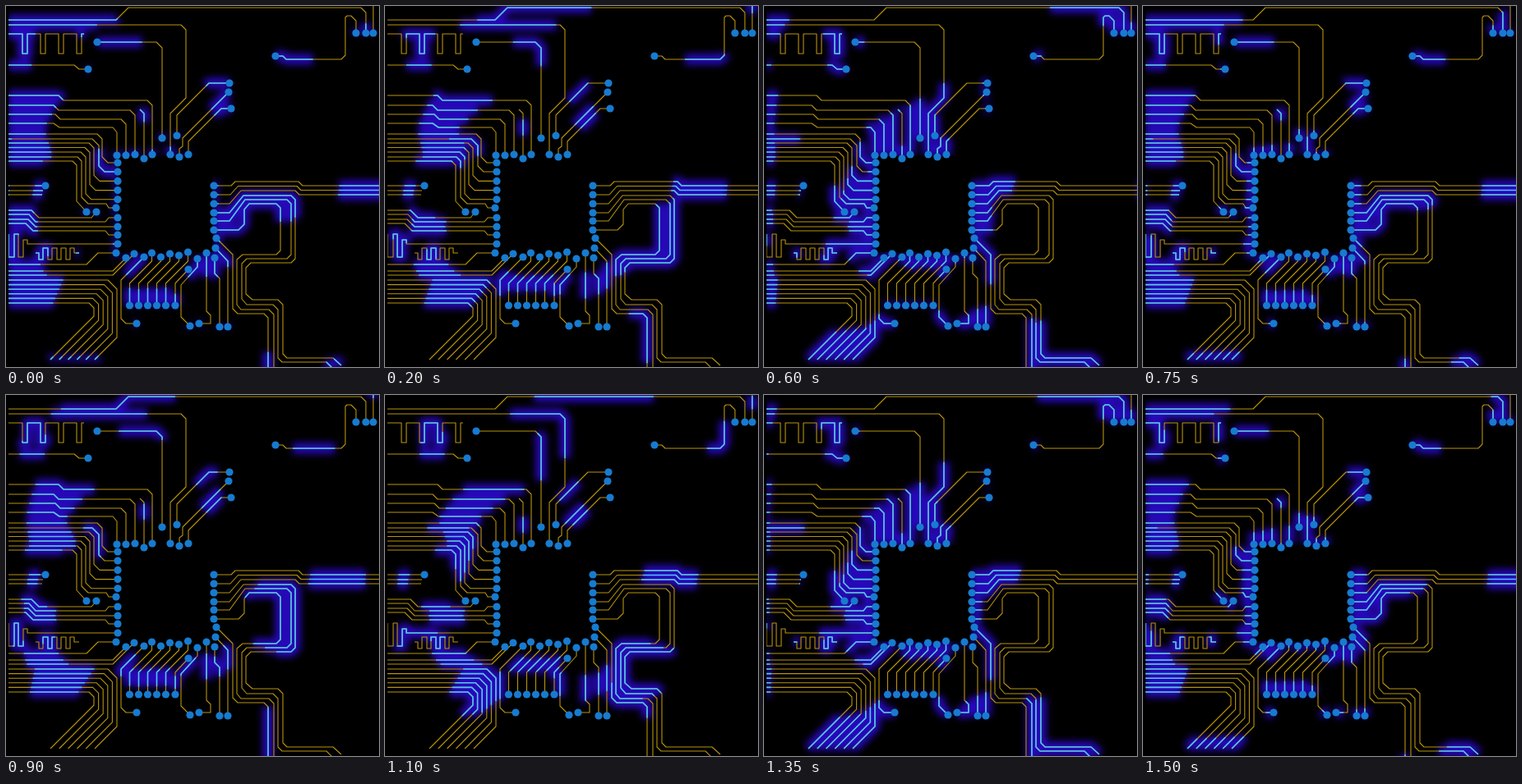
Recreate the animation shown at these times as an HTML page. Size 454 by 440 pixels, loop 1.55 s.

```html
<!DOCTYPE html>
<html lang="en">
<head>
<meta charset="utf-8">
<title>Circuit pulses</title>
<style>
  html, body { margin: 0; width: 100%; height: 100%; overflow: hidden; background: #000; }
  svg { display: block; width: 454px; height: 440px; }
  path { fill: none; stroke-linejoin: round; }
  #base path { stroke: #b8930c; stroke-width: 1.1; }
  #glow path { stroke: #2708b8; stroke-width: 13; }
  #core path { stroke: #4cc4ff; stroke-width: 1.6; }
  #pins circle { fill: #177bd0; }
  #glow path, #core path {
    stroke-dasharray: 31 69;
    animation: flow 1550ms steps(31, end) infinite;
  }
  @keyframes flow {
    from { stroke-dashoffset: 2.5; }
    to { stroke-dashoffset: -197.5; }
  }
</style>
</head>
<body>
<svg viewBox="0 0 454 440">
  <defs>
    <filter id="soft" filterUnits="userSpaceOnUse" x="-30" y="-30" width="514" height="500" color-interpolation-filters="sRGB">
      <feGaussianBlur stdDeviation="4"/>
    </filter>
    <clipPath id="board"><rect x="3" width="451" height="440"/></clipPath>
  </defs>
  <g clip-path="url(#board)">
    <g id="glow" filter="url(#soft)"></g>
    <rect x="137" y="183" width="114" height="117"/>
    <g id="base"></g>
    <g id="core"></g>
    <g id="pins"></g>
  </g>
</svg>
<script>
const NONE = 0, START = 1, END = 2, BOTH = 3;
const layer = id => document.getElementById(id);

function add(parent, tag, attrs) {
  const el = document.createElementNS('http://www.w3.org/2000/svg', tag);
  for (const k in attrs) el.setAttribute(k, attrs[k]);
  return layer(parent).appendChild(el);
}

// Each wire is drawn in its pulse direction; ends says where a pin sits.
function wire(ends, ...paths) {
  for (const d of paths) {
    const base = add('base', 'path', { d });
    add('glow', 'path', { d, pathLength: 100 });
    add('core', 'path', { d, pathLength: 100 });
    const pin = at => {
      const p = base.getPointAtLength(at);
      add('pins', 'circle', { cx: p.x, cy: p.y, r: 4.6 });
    };
    if (ends & START) pin(0);
    if (ends & END) pin(base.getTotalLength());
  }
}

const times = (n, fn) => Array.from({ length: n }, (_, i) => fn(i));

// Top edge
wire(END,
  'M3,17H134l15,-15H432l6,6V33',
  'M3,23H213l6,6V112L200,131V181',
  'M3,72H83l6,5H100',
  'M447,-20V33');
wire(BOTH,
  'M111,44H183l7,7V161',
  'M328,61H337l4,4H408l5,-5V14l2,-2H420l6,6V33');
wire(NONE, 'M3,34H20' + 'v24h6v-24h16'.repeat(3) + 'v24h6v-24h3');

// Upper left to the top pins
wire(END,
  'M3,109H64l6,6H172l6,6V181',
  'M3,121H58l6,6H151l6,6V181',
  'M3,132H60l6,6H140l6,6V182',
  'M3,143H58l7,5H130l5,6V182',
  'M163,126l5,5V186');

// Upper left to the left pins, one of them flowing outwards
times(5, i => {
  const y = 156 + 5.5 * i, x = 117 - 5 * i, pin = 191 + 11.2 * i;
  if (i === 1) wire(START, 'M136,202H120l-7,-7V170l-8,-8H3');
  else wire(END, `M3,${y}H${x - 6}l6,6V${pin - 7}l7,7H136`);
});
wire(END,
  'M3,184H87l5,5V233l8,8H122l3,5H134',
  'M3,189H81l5,5V238L98,251');

// Left middle
wire(START, 'M48,219H3');
wire(NONE, 'M45,225H3', 'M44,230H3');
wire(END,
  'M3,249H31l9,9H104L110,251',
  'M3,254H28l8,9H121l4,-5H136',
  'M3,260H27l9,9H136',
  'M3,265H24l9,9H121l4,5H136',
  'M3,278V306H10V278H15V306H21V285H26V290H136');
wire(NONE, 'M36,301H40v8h5v-14' + 'h6v14h5v-14'.repeat(3) + 'h5v6h6');

// Lower left
wire(END,
  'M3,315H98l14,-14H134',
  'M3,323H130L146,307',
  'M3,328H130L156,302');
wire(NONE, ...times(6, i => {
  const x = 135 - 5.6 * i, y = 334 + 5.6 * i, r = 11 - i;
  return `M3,${y}H${x - r}l${r},${r}V${404 - 5.2 * i}L${108 - 10.8 * i},431`;
}));

// Below the chip
wire(BOTH,
  ...[301, 306, 302, 304, 300].map((y, i) => `M${150.5 + 11 * i},365V338l27,-27V${y}`),
  'M206,365V338L222,321',
  'M168,306L140,334V381l6,6H159',
  'M233,308V318L213,340V379L224,390',
  'M244,301V372l5,5V387H235',
  'M254,307V326l6,6V391',
  'M255,295L270,311V391');

// Upper right to the top pins
wire(BOTH,
  'M272,94H247L208,133V158',
  'M271,105L215,161V171L211,174V184',
  'M274,125H262L222,165V181');

// Right bus
wire(END, ...times(3, i => {
  const y = 219 + 5.5 * i;
  return `M468,${y}H${361 - 2 * i}l-5,-5H${279 + 3.5 * i}L${274 - i},${219 + 11 * i}H253`;
}));

// Loops on the right
wire(START,
  'M253,252H272L289,231H347l5,5V308l-5,5H298l-6,6V351l8,7H331l6,6V424l5,5H398l10,9',
  'M253,262H272L291,236H342l5,5V303l-5,5H293l-6,6V357l6,7H325l6,6V429l5,5H390l8,8',
  'M253,273H283l7,-7V248l6,-7H329l5,5V298l-5,5H288l-7,6V364l5,6H320l6,6V490');
wire(END, 'M319,495V380l-5,-5H282l-6,-6V303L256,283');
</script>
</body>
</html>
```
